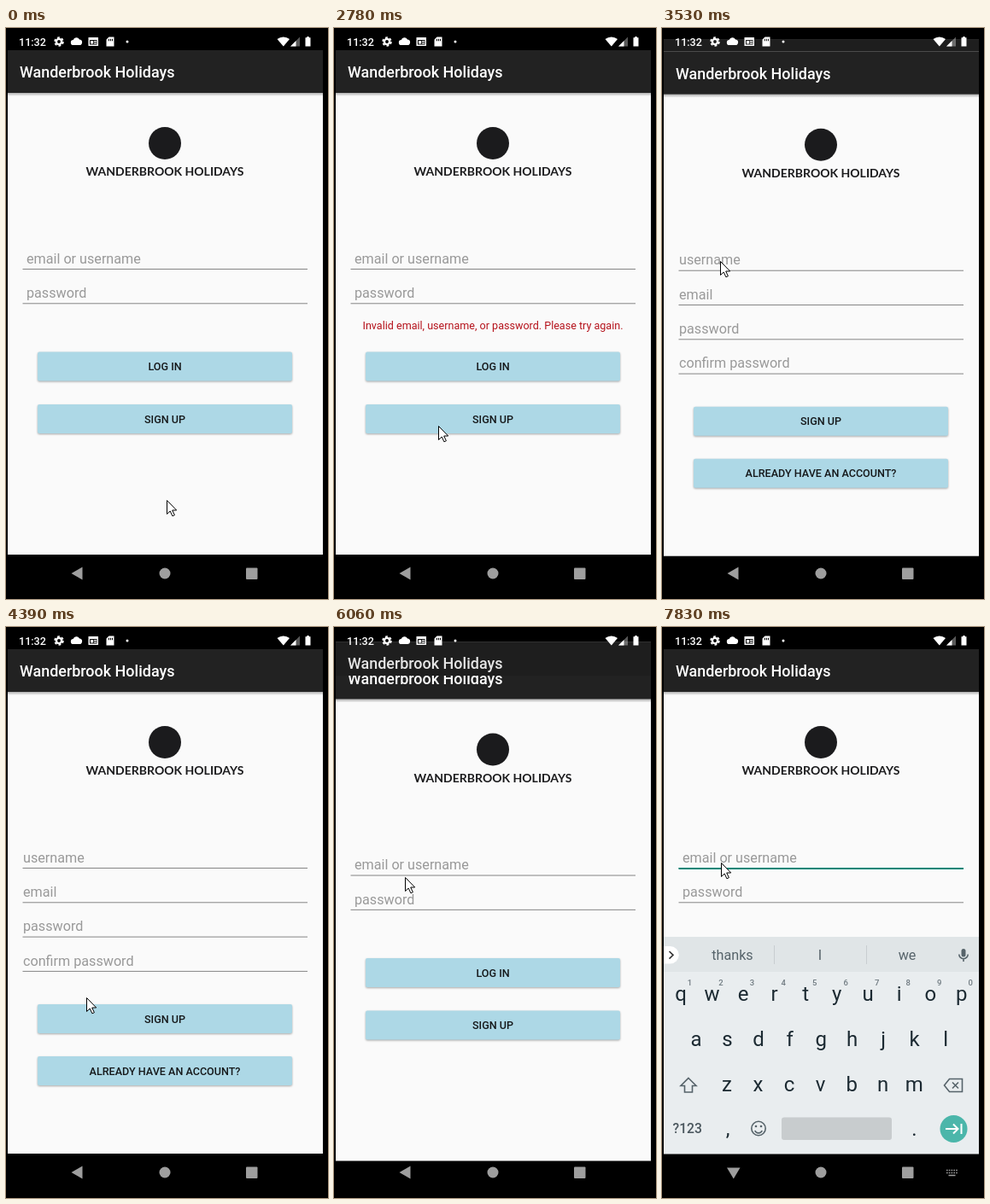
Write an HTML page that moves like this. It is 377x669 px and loops after 8000 ms.

```html
<!DOCTYPE html>
<html lang="en">
<head>
<meta charset="utf-8">
<title>Login flow</title>
<style>
  html, body { margin: 0; width: 100%; height: 100%; overflow: hidden; background: #000; }
  svg { display: block; font-family: Roboto, sans-serif; }
  .mid { text-anchor: middle; }
  .title { font-size: 17.96px; font-weight: 500; fill: #fff; }
  .brand { font: 700 14px Lato, sans-serif; fill: #1b1b1d; }
  .hint { font-size: 16.16px; fill: #999; }
  .label { font-size: 12.57px; font-weight: 500; fill: #16191b; }
  .error { font-size: 12.57px; fill: #b5121b; }
  .btn { fill: #add8e6; filter: drop-shadow(0 1px 1px rgba(0,0,0,.33)); }
  .word { font-size: 16.16px; fill: #56636a; }
  .key { font-size: 24px; fill: #1c2a32; }
  .num { font-size: 9.5px; font-weight: 500; fill: #6f7a80; }
  .line { fill: none; stroke: #56636a; stroke-width: 1.6; }
</style>
</head>
<body>
<svg width="377" height="669" viewBox="0 0 377 669">
  <defs>
    <linearGradient id="shade" x2="0" y2="1">
      <stop offset="0" stop-color="#000" stop-opacity=".3"/>
      <stop offset="1" stop-color="#000" stop-opacity="0"/>
    </linearGradient>
    <clipPath id="reveal"><rect id="revealBox" x="2" width="369" height="700"/></clipPath>
    <clipPath id="screen"><rect x="2" y="3" width="369" height="656"/></clipPath>
  </defs>
  <rect width="377" height="669"/>
  <g id="navBack"></g>
  <g id="pages" clip-path="url(#screen)">
    <g id="signup"></g>
    <g id="login"></g>
  </g>
  <g clip-path="url(#screen)"><g id="keyboard"></g></g>
  <g id="navFront"></g>

  <g id="status" fill="#fff">
    <text x="15" y="20.5" font-size="12.57" font-weight="500">11:32</text>
    <circle cx="62" cy="16" r="3.1" fill="none" stroke="#fff" stroke-width="2.4"/>
    <circle cx="62" cy="16" r="4.9" fill="none" stroke="#fff" stroke-width="1.7" stroke-dasharray="2.8 2.33"/>
    <path d="M79 20a3 3 0 0 1-.3-6 4 4 0 0 1 7.3-.6 3.3 3.3 0 0 1-.4 6.6z"/>
    <path d="M96.500 11h11.500v10h-11.500zM98 14v5.500h8.500v-5.500zM99 15h3.200v3.500h-3.200zM103 15h3v1.200h-3zM103 17.300h3v1.200h-3z" fill-rule="evenodd"/>
    <path d="M120.500 10.500h6v11h-9v-8zM120 12.800v2.400h1v-2.400zM122 12.800v2.400h1v-2.400zM124 12.800v2.400h1v-2.400z" fill-rule="evenodd"/>
    <circle cx="142" cy="16" r="1.500"/>
    <path d="M317.500 13a11.500 11.500 0 0 1 14.500 0l-7.200 8.500z"/>
    <path d="M344 10.500v11h-11z" opacity=".35"/>
    <path d="M339.500 15v6.500h-6.500z"/>
    <path d="M352.300 10h2.400v1.200h1.800v10.300h-6v-10.300h1.800z"/>
  </g>
  <path id="mouse" d="M.5 .5V16.500l3.700-3.500 2.700 5.800 2.500-1.100-2.700-5.700h5z" fill="#fff" stroke="#000"/>
</svg>

<script>
const $ = id => document.getElementById(id);
const clamp = (v, lo = 0, hi = 1) => Math.min(hi, Math.max(lo, v));
const show = (node, on) => node.style.display = on ? '' : 'none';
const text = (cls, x, y, s) => `<text class="${cls}" x="${x}" y="${y}">${s}</text>`;

// Static parts

const NAME = 'Wanderbrook Holidays';

const frame = `
  <rect x="2" y="26" width="369" height="591" fill="#fafafa"/>
  <rect x="2" y="76" width="369" height="4" fill="url(#shade)"/>
  <rect x="2" y="26" width="369" height="50" fill="#222"/>
  ${text('title', 16, 58, NAME)}
  <circle cx="186" cy="135" r="19" fill="#1b1b1d"/>
  ${text('brand mid', 186, 173, NAME.toUpperCase())}`;

const field = (x, row, label) => text('hint', x, 275.7 + row * 40.3, label) +
  `<rect x="19.500" y="${282 + row * 40.3}" width="333.500" height="1" fill="#858585"/>`;

const button = (id, y, label) => `
  <rect class="btn" x="37" y="${y}" width="298" height="34" rx="2"/>
  <clipPath id="${id}Clip"><circle/></clipPath>
  <rect id="${id}" x="37" y="${y}" width="298" height="34" rx="2" clip-path="url(#${id}Clip)" opacity="0"/>
  ${text('label mid', 186, y + 21.500, label)}`;

$('login').innerHTML = frame +
  field(24, 0, 'email or username') + field(24, 1, 'password') +
  `<g id="focus"><rect x="19.500" y="282" width="333.500" height="2" fill="#008577"/>
   <rect id="caret" x="19.300" y="258.500" width="1.700" height="22" fill="#008577"/></g>
   <g id="error">${text('error mid', 186, 353, 'Invalid email, username, or password. Please try again.')}</g>` +
  button('tapLogin', 379.5, 'LOG IN') + button('tapSignup', 441, 'SIGN UP');

$('signup').innerHTML = frame +
  ['username', 'email', 'password', 'confirm password'].map((s, i) => field(20, i, s)).join('') +
  button('tapCreate', 442, 'SIGN UP') + button('tapBack', 503, 'ALREADY HAVE AN ACCOUNT?');

const keyRow = (letters, x, y) =>
  [...letters].map((c, i) => text('key mid', x + i * 36.53, y, c)).join('');

$('keyboard').innerHTML = `
  <rect x="2" y="363" width="369" height="254.500" fill="#e9edef"/>
  <rect x="2" y="363" width="369" height="41" fill="#e0e5e7"/>
  <path d="M2 374h7.500a10 10 0 0 1 0 20.500h-7.500z" fill="#fff"/>
  <path class="line" d="M8.500 380l4.500 4.300-4.500 4.300" style="stroke:#333"/>
  <path d="M131.500 373v22M239.500 373v22" stroke="#c9ced1"/>
  ${text('word mid', 82.5, 390, 'thanks')}${text('word mid', 185, 390, 'I')}${text('word mid', 287, 390, 'we')}
  <rect x="350.500" y="377" width="5" height="9.500" rx="2.500" fill="#56636a"/>
  <path class="line" d="M347.800 383.500a5.200 5.200 0 0 0 10.400 0M353 388.500v3.500"/>
  ${keyRow('qwertyuiop', 22, 438)}
  ${[...'1234567890'].map((c, i) => text('num mid', 32.5 + i * 36.53, 420, c)).join('')}
  ${keyRow('asdfghjkl', 40, 490.5)}
  ${keyRow('zxcvbnm', 76, 543.5)}
  <path class="line" d="M31 528.500l9 9h-4.500v7.500h-9v-7.500h-4.500z"/>
  <path class="line" d="M336.500 529.500h15v15h-15l-6-7.500zM340 533.500l7 7M347 533.500l-7 7"/>
  <text x="12.500" y="593" font-size="15.700" font-weight="500" fill="#4b575e">?123</text>
  ${text('key mid', 77, 596, ',')}${text('key mid', 295.5, 596, '.')}
  <circle class="line" cx="113" cy="587.500" r="8.200"/>
  <path class="line" d="M108.800 590a4.500 4.500 0 0 0 8.400 0"/>
  <circle cx="110" cy="585" r="1.300" fill="#56636a"/><circle cx="116" cy="585" r="1.300" fill="#56636a"/>
  <rect x="140" y="574.500" width="129" height="26.500" rx="3" fill="#c8ccce"/>
  <circle cx="341.500" cy="588" r="16" fill="#4bb6aa"/>
  <path d="M332 588h14M341 582.500l5.500 5.500-5.500 5.500M350.500 582v12" fill="none" stroke="#fff" stroke-width="2"/>`;

const navShapes = `
  <circle cx="186" cy="639" r="6.500"/>
  <rect x="281" y="632.500" width="13.500" height="13.500" rx="1"/>`;
const nav = extra => `<g fill="#fff" opacity=".62">${extra}${navShapes}</g>`;
$('navBack').innerHTML = nav('<path d="M89.500 631.500v15l-13-7.500z"/>');
$('navFront').innerHTML = nav(`
  <path d="M76 633.500h15.500l-7.700 13z"/>
  <path d="M333 636.500h13M333 639.500h13" stroke="#fff" stroke-width="1.600" stroke-dasharray="1.600 1.200"/>
  <path d="M335.500 642.500h8" stroke="#fff" stroke-width="1.500"/>`);

// Timing

const LOOP = 8000;
const TO_SIGNUP = 3235, TO_LOGIN = 5875, SLIDE = 425;
const FOCUS = 6350, KEYS = 6520;

const linear = u => u;
const smooth = u => u * u * (3 - 2 * u);
const slowDown = u => 1 - (1 - u) ** 2;

// y for a given x on a cubic Bezier
const bezier = (a, b, c, d) => x => {
  const at = (k, t) => a[k] * (1 - t) ** 3 + 3 * b[k] * t * (1 - t) ** 2 + 3 * c[k] * t * t * (1 - t) + d[k] * t ** 3;
  let lo = 0, hi = 1;
  for (let i = 0; i < 24; i++) {
    const m = (lo + hi) / 2;
    at(0, m) < x ? lo = m : hi = m;
  }
  return at(1, lo);
};
const slideEase = bezier([0, 0], [.4, 0], [.2, 1], [1, 1]);
const knee = [1 / 6, .4];
const rise = bezier([0, 0], [.05, 0], [.1333, .06], knee);
const settle = bezier(knee, [.2083, .82], [.25, 1], [1, 1]);
const clipEase = x => x < knee[0] ? rise(x) : settle(x);

// time, x, y, easing on the way there
const path = [
  [0, 188, 553, linear], [1090, 188, 553, linear], [1570, 142, 399, smooth],
  [1870, 142, 399, linear], [2150, 133, 389, smooth], [2520, 133, 389, linear],
  [2780, 122, 466, smooth], [3060, 122, 466, linear], [3330, 73, 290, linear],
  [3790, 65, 265, slowDown], [3820, 65, 265, linear], [4390, 94, 434, linear],
  [4620, 97, 462, slowDown], [5340, 139, 520, smooth], [5460, 139, 520, linear],
  [5490, 137, 516, linear], [5690, 137, 516, linear], [5910, 122, 323, linear],
  [6300, 59, 275, slowDown], [6520, 59, 275, linear], [6640, 69, 276, smooth],
  [LOOP, 69, 276, linear]
];

function moveMouse(t) {
  const i = path.findIndex(p => p[0] > t);
  const [t0, x0, y0] = path[i - 1], [t1, x1, y1, ease] = path[i];
  const u = ease((t - t0) / (t1 - t0));
  $('mouse').setAttribute('transform',
    `translate(${Math.round(x0 + (x1 - x0) * u)} ${Math.round(y0 + (y1 - y0) * u)})`);
}

function ripple(id, t, start, x, y) {
  const age = t - start;
  const alpha = age < 0 ? 0 : .12 * clamp(age / 75) * clamp(1 - (age - 160) / 170);
  $(id).setAttribute('opacity', alpha);
  const c = $(id + 'Clip').firstChild;
  c.setAttribute('cx', x);
  c.setAttribute('cy', y);
  c.setAttribute('r', 50 + 250 * clamp(age / 130));
}

function reset(page) {
  page.removeAttribute('transform');
  page.removeAttribute('clip-path');
  page.setAttribute('opacity', 1);
}

function slide(enter, exit, age) {
  const u = clamp(age / SLIDE), q = slideEase(u);
  enter.setAttribute('transform', `translate(0 ${27 * (1 - q)})`);
  enter.setAttribute('clip-path', 'url(#reveal)');
  $('revealBox').setAttribute('y', 4 + 629 * (1 - clipEase(u)));
  exit.setAttribute('transform', `translate(0 ${-13 * q})`);
  exit.setAttribute('opacity', 1 - .1 * clamp(age / 117));
}

function drawPages(t) {
  const login = $('login'), signup = $('signup');
  const back = t >= TO_LOGIN;
  const [enter, exit] = back ? [login, signup] : [signup, login];
  const age = t - (back ? TO_LOGIN : TO_SIGNUP);
  if ($('pages').lastElementChild !== enter) $('pages').append(enter);
  reset(login);
  reset(signup);
  show(enter, age >= 0);
  show(exit, age < SLIDE);
  if (age >= 0 && age < SLIDE) slide(enter, exit, age);
}

function draw(t) {
  drawPages(t);
  show($('error'), t >= 1800 && t < TO_LOGIN);
  ripple('tapLogin', t, 1720, 142, 399);
  ripple('tapSignup', t, 3000, 122, 466);
  ripple('tapBack', t, 5640, 137, 516);

  show($('focus'), t >= FOCUS);
  show($('caret'), t < 6850 || t >= 7340 && t < 7830);

  const typing = t >= KEYS;
  const u = clamp((t - KEYS) / 120);
  show($('keyboard'), typing);
  show($('navFront'), typing);
  show($('navBack'), !typing);
  $('keyboard').setAttribute('transform', `translate(0 ${41 * (1 - u) ** 2})`);
  $('keyboard').setAttribute('opacity', .63 + .37 * u);

  moveMouse(t);
}

const begin = performance.now();
function tick() {
  draw((performance.now() - begin) % LOOP);
  requestAnimationFrame(tick);
}
tick();
</script>
</body>
</html>
```
